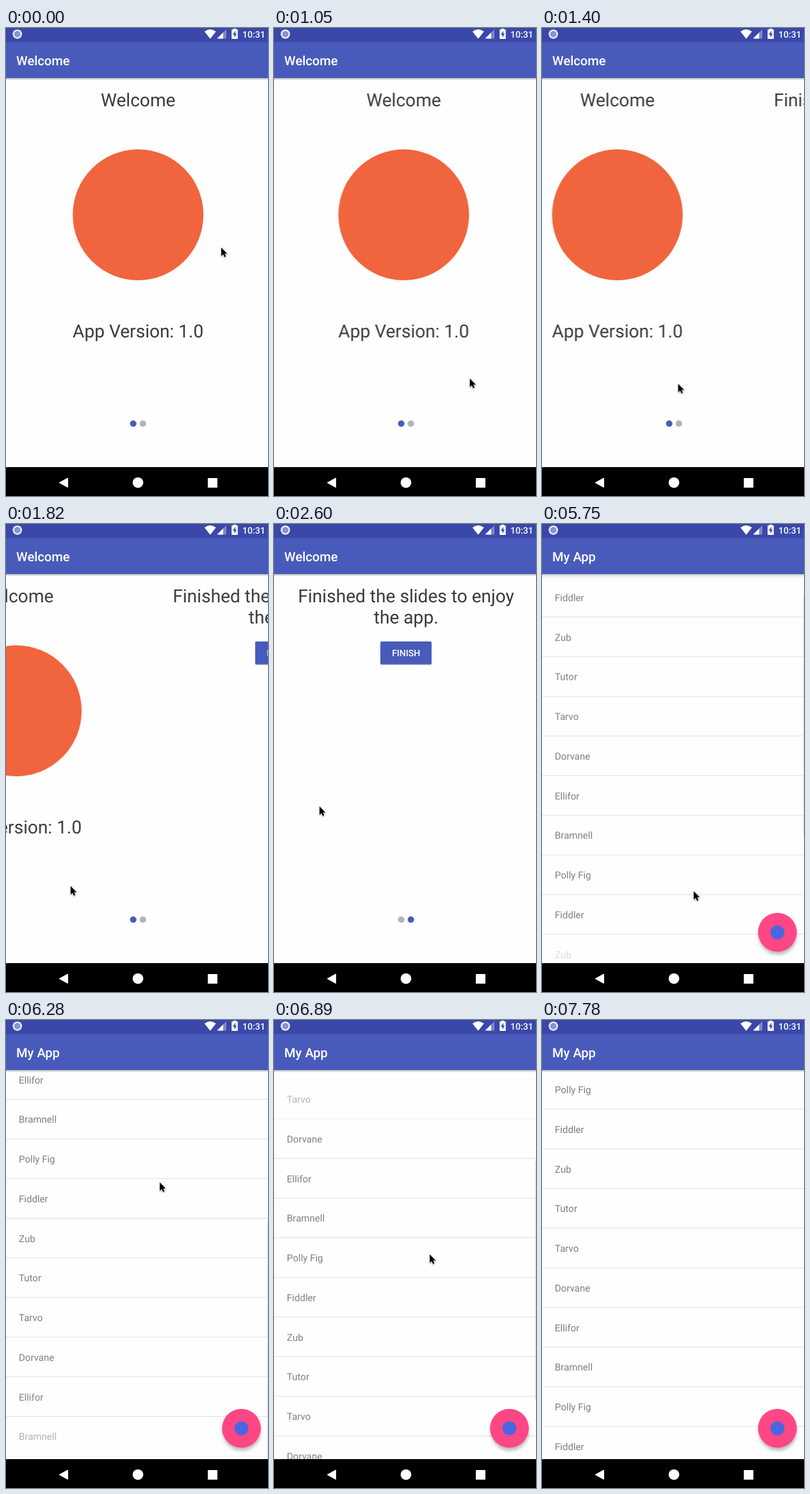
Animation of 409x729 px, one loop 8.94 s. Source, as an HTML page:

```html
<!DOCTYPE html>
<html lang="en">
<head>
<meta charset="utf-8">
<title>Welcome slides</title>
<style>
  html, body { margin: 0; width: 100%; height: 100%; overflow: hidden; background: #fefefe; }
  svg { display: block; width: 100%; height: 100%; font-family: Roboto, sans-serif; text-rendering: geometricPrecision; }
  .title { font-size: 20.1px; font-weight: 500; fill: #fff; }
  .heading { font-size: 28.1px; fill: #3a3a3a; text-anchor: middle; }
  .label { font-size: 14.05px; font-weight: 500; fill: #fff; }
  .row text { font-size: 15.05px; fill: #7f7f7f; }
  .row rect { fill: #dedede; }
  .primary { fill: #485bbb; }

  #pager, #list, #thumb, #cursor, #intro, #bleach, #lift, #bar, #dot1, #dot2, .row {
    animation: 8940ms linear infinite;
  }
  #pager { animation-name: swipe; }
  #list { animation-name: scroll; }
  #thumb { animation-name: thumb; }
  #bar { animation-name: bar; }
  #cursor { animation-name: cursor; filter: drop-shadow(0 1px 1px rgba(0, 0, 0, .35)); }
  #intro { animation-name: leave; }
  #bleach { animation-name: bleach; animation-timing-function: step-end; }
  #lift { animation-name: lift; animation-timing-function: step-end; }
  #dot1 { animation-name: dot1; animation-timing-function: step-end; }
  #dot2 { animation-name: dot2; animation-timing-function: step-end; }
  .row { animation-name: appear; }

  @keyframes swipe {
    0%, 10.6% { transform: translateX(0); }
    11.745% { transform: translateX(-3.5px); }
    20.358% { transform: translateX(-190px); }
    22.371% { transform: translateX(-222px); animation-timing-function: cubic-bezier(.2, .6, .3, 1); }
    27.4%, 100% { transform: translateX(-413px); }
  }
  @keyframes dot1 { 0% { fill: #485bbb; } 22.371%, 100% { fill: #b4b4b4; } }
  @keyframes dot2 { 0% { fill: #b4b4b4; } 22.371%, 100% { fill: #485bbb; } }
  @keyframes lift { 0% { opacity: 0; } 40.8%, 100% { opacity: .1; } }
  @keyframes leave {
    0% { opacity: 1; animation-timing-function: step-end; }
    49.5% { opacity: .12; animation-timing-function: step-end; }
    50.5%, 100% { opacity: 0; }
  }
  @keyframes bleach { 0% { opacity: 0; } 49.5% { opacity: .1; } 50.5%, 100% { opacity: 0; } }
  @keyframes scroll {
    0%, 63.423% { transform: translateY(0); }
    69.687%, 73.826% { transform: translateY(-386px); }
    81.991%, 100% { transform: translateY(0); }
  }
  @keyframes thumb {
    0%, 63.423% { transform: translateY(0); }
    69.687%, 73.826% { transform: translateY(236px); }
    81.991%, 100% { transform: translateY(0); }
  }
  @keyframes bar {
    0%, 52% { opacity: 1; }
    55%, 63% { opacity: 0; }
    63.4%, 82% { opacity: 1; }
    85%, 100% { opacity: 0; }
  }
  @keyframes appear { 0% { opacity: 0; } 2.8%, 100% { opacity: 1; } }
  @keyframes cursor {
    0% { transform: translate(336px, 342px); animation-timing-function: ease-in-out; }
    7.83%, 9.9% { transform: translate(330px, 546px); }
    11.745% { transform: translate(306px, 546px); }
    20.358% { transform: translate(101px, 564px); }
    22.371% { transform: translate(75px, 560px); }
    29.083% { transform: translate(71px, 440px); }
    30.984% { transform: translate(73px, 408px); }
    34.676% { transform: translate(180px, 170px); }
    35.57% { transform: translate(192px, 152px); }
    36.8%, 56.935% { transform: translate(202.5px, 204.5px); animation-timing-function: ease-in-out; }
    61.41%, 62.86% { transform: translate(236px, 651px); }
    70.246% { transform: translate(240px, 253px); }
    72.48% { transform: translate(241px, 222px); }
    74.16% { transform: translate(241px, 225px); }
    84% { transform: translate(248px, 697px); }
    87%, 100% { transform: translate(304px, 735px); }
  }
</style>
</head>
<body>
<svg viewBox="0 0 409 729">
  <defs>
    <linearGradient id="shade" x2="0" y2="1">
      <stop stop-color="#000" stop-opacity=".25"/>
      <stop offset="1" stop-color="#000" stop-opacity="0"/>
    </linearGradient>
    <filter id="blur" x="-30%" y="-30%" width="160%" height="160%">
      <feGaussianBlur stdDeviation="2.5"/>
    </filter>
    <g id="appbar">
      <rect class="primary" y="22" width="409" height="56"/>
      <rect y="78" width="409" height="4" fill="url(#shade)"/>
    </g>
  </defs>

  <g id="home">
    <rect width="409" height="729" fill="#fefefe"/>
    <g id="list"></g>
    <g id="bar"><rect id="thumb" x="408" y="78" width="1" height="372" fill="#d8d8d8"/></g>
    <circle cx="368" cy="641" r="30" opacity=".25" filter="url(#blur)"/>
    <circle cx="367.5" cy="636" r="30.3" fill="#ff4785"/>
    <circle cx="367.5" cy="636" r="10.8" fill="#4a66e0"/>
    <use href="#appbar"/>
    <rect id="bleach" y="22" width="409" height="662" fill="#fff" opacity="0"/>
    <text class="title" x="16" y="57.5">My App</text>
  </g>

  <g id="intro">
    <rect y="78" width="409" height="606" fill="#fefefe"/>
    <g id="pager">
      <text class="heading" x="206.2" y="122">Welcome</text>
      <circle cx="206.2" cy="291" r="102" fill="#f0653d"/>
      <text class="heading" x="206.2" y="482">App Version: 1.0</text>
      <g transform="translate(413)">
        <text class="heading" x="206.2" y="122">Finished the slides to enjoy</text>
        <text class="heading" x="206.2" y="155">the app.</text>
        <rect id="lift" x="166" y="184" width="80" height="38.5" rx="3"/>
        <rect x="166" y="184" width="80" height="36" rx="2" opacity=".22"/>
        <rect class="primary" x="166" y="183" width="80" height="35.5" rx="2"/>
        <text class="label" x="206.2" y="206" text-anchor="middle">FINISH</text>
      </g>
    </g>
    <circle id="dot1" cx="198.6" cy="616.3" r="5"/>
    <circle id="dot2" cx="213.7" cy="616.3" r="5"/>
    <use href="#appbar"/>
    <text class="title" x="16" y="57.5">Welcome</text>
  </g>

  <g id="status" fill="#fff">
    <rect width="409" height="22" fill="#3a48a9"/>
    <circle cx="17.7" cy="9.5" r="7.3" fill="#e6e9f7"/>
    <circle cx="17.7" cy="9.5" r="4" fill="#8f98d0" stroke="#5f6bbb"/>
    <path d="M309.8 5.6Q318.8-1.4 327.8 5.6L318.8 16.8Z"/>
    <path d="M344 2V16.5H329.5Z" opacity=".35"/>
    <path d="M339 7V16.5H329.5Z"/>
    <path d="M354.8 2.2V1h4.4v1.2h2.6V17h-9.6V2.2Z"/>
    <path d="M358 4.5L354 10.5H356.6V15L360.2 8.8H358Z" fill="#3a48a9"/>
    <text class="label" x="369" y="15">10:31</text>
  </g>

  <g id="nav" fill="#fff">
    <rect y="684" width="409" height="45" fill="#000"/>
    <path d="M83.2 708.3L96.5 701V715.6Z" stroke="#fff" stroke-linejoin="round"/>
    <circle cx="206" cy="708.2" r="8.3"/>
    <rect x="315" y="701" width="15" height="15" rx=".8"/>
  </g>

  <path id="cursor" d="M0 0V13.2L3 10.4L5.2 15L7.4 14L5.3 9.5H9.4Z" stroke="#fff" stroke-width="1.2" paint-order="stroke"/>
</svg>
<script>
  const names = ['Polly Fig', 'Fiddler', 'Zub', 'Tutor', 'Tarvo', 'Dorvane', 'Ellifor', 'Bramnell'];
  const pitch = 61.75, viewport = 606, range = 386;
  const list = document.getElementById('list');

  // Time at which a row scrolls into view and starts to fade in.
  const entryTime = i => i >= 10
    ? 5670 + 560 * (i * pitch - viewport) / range
    : 6600 + 730 * (range - (i + 1) * pitch) / range;

  for (let i = 0; i < 16; i++) {
    const fades = i < 6 || i > 9;
    const style = fades ? `animation-delay:${entryTime(i)}ms` : 'animation:none';
    list.insertAdjacentHTML('beforeend',
      `<g class="row" style="${style}">
        <text x="20" y="${114 + i * pitch}">${names[i % 8]}</text>
        <rect y="${138.5 + i * pitch}" width="409" height="1"/>
      </g>`);
  }
</script>
</body>
</html>
```
